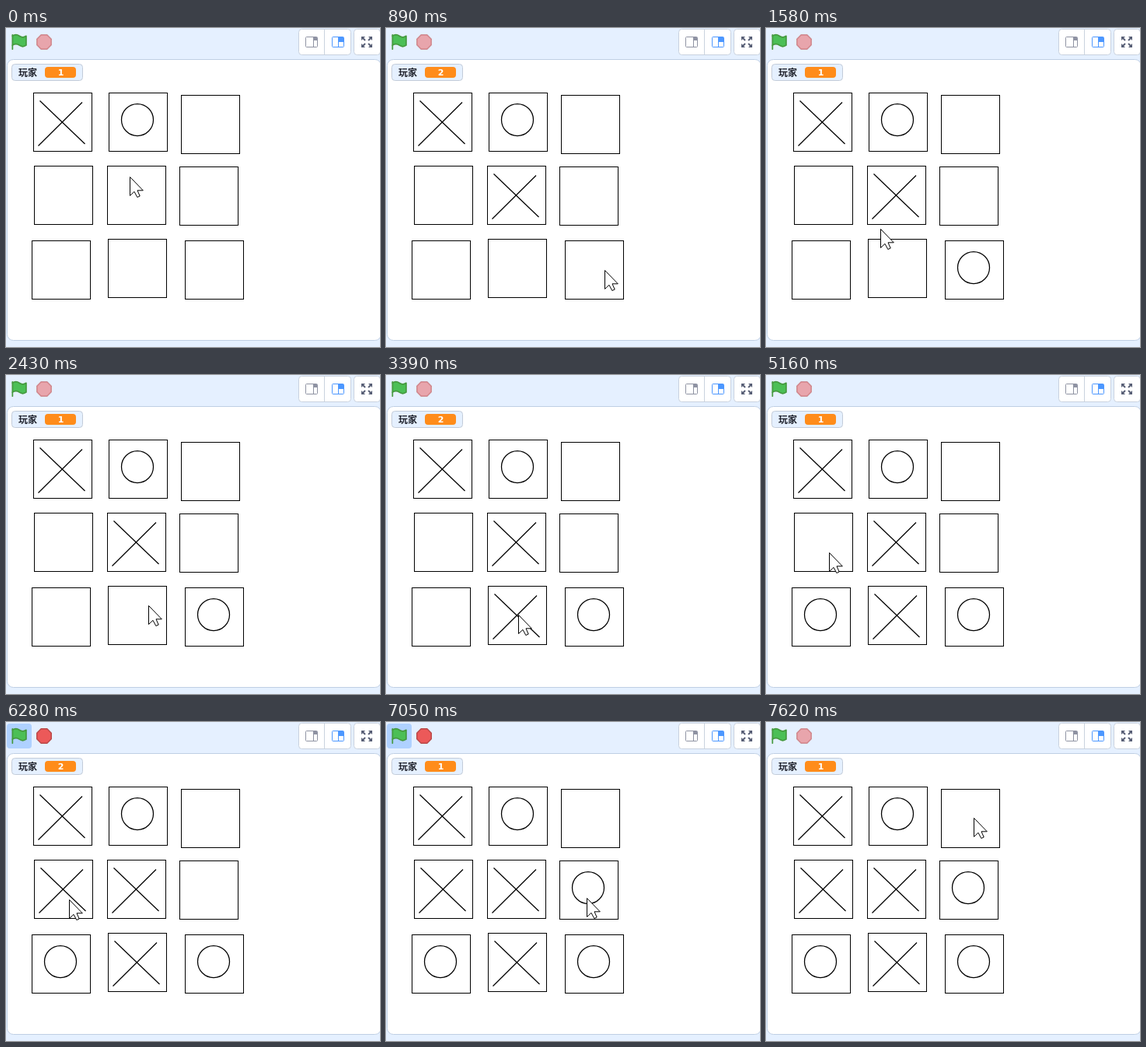
An HTML page with a canvas that plays this animation: 481x410 px, repeating every 8 s.

```html
<!DOCTYPE html>
<html lang="zh">
<head>
<meta charset="utf-8">
<style>
html, body { margin: 0; width: 100%; height: 100%; overflow: hidden; background: #e5f0ff; }
canvas { display: block; }
</style>
</head>
<body>
<canvas id="stage" width="481" height="410"></canvas>
<script>
const ctx = document.getElementById('stage').getContext('2d');
const LOOP = 8000;
const CELL = 75;
const TICK = 130;

// Corners of the loosely placed board squares, row by row.
const corners = [
  [35, 83], [132, 83], [225, 86],
  [36, 177], [130, 177], [223, 178],
  [33, 273], [131, 271], [230, 273]
];

// Time and square of each move; crosses and circles take turns.
const moves = [
  [0, 0], [0, 1], [160, 4], [1170, 8],
  [3390, 7], [4610, 6], [6280, 3], [7050, 5]
];

// Spans in which the program shows as running.
const runs = [[6280, 6400], [7050, 7210]];

// Each glide arrives at a time, in a number of ticks, at a point.
const home = { x: 159, y: 191 };
const glides = [
  [580, 2, 304, 259], [730, 1, 273, 331], [890, 1, 281, 311],
  [1430, 2, 180, 309], [1580, 1, 147, 258], [2130, 4, 96, 224],
  [2430, 1, 183, 296], [2560, 1, 161, 322], [2830, 2, 170, 308],
  [3630, 2, 117, 323], [3900, 2, 89, 313], [5020, 2, 88, 256],
  [5160, 1, 81, 228], [6650, 3, 283, 206], [7050, 3, 258, 226],
  [7620, 2, 267, 123]
].map(([end, ticks, x, y]) => ({ end, ticks, x, y }));

const flagCloth = new Path2D('M.75,2A6.44,6.44,0,0,1,8.44,2h0a6.44,6.44,0,0,0,7.69,0V12.4a6.44,6.44,0,0,1-7.69,0h0a6.44,6.44,0,0,0-7.69,0');
const flagPole = new Path2D('M.75,16.75V.75');
const octagon = new Path2D('M4.3,.5H9.7L13.5,4.3V9.7L9.7,13.5H4.3L.5,9.7V4.3Z');
const arrow = new Path2D('M.5,.5V24.5L6,19.3L9.8,26.5L13.2,25L10,17.8H17.3Z');

const easeOut = p => p * (2 - p);
const mix = (a, b, p) => Math.round(a + (b - a) * p);

function pointerAt(t) {
  const next = glides.findIndex(glide => glide.end > t);
  if (next < 0) return glides.at(-1);
  const from = glides[next - 1] ?? home;
  const to = glides[next];
  const ticksLeft = Math.ceil((to.end - t) / TICK);
  const p = easeOut(Math.max(0, 1 - ticksLeft / to.ticks));
  return { x: mix(from.x, to.x, p), y: mix(from.y, to.y, p) };
}

function box(x, y, w, h, radius, fill, stroke) {
  ctx.beginPath();
  ctx.roundRect(x, y, w, h, radius);
  if (fill) { ctx.fillStyle = fill; ctx.fill(); }
  if (stroke) { ctx.strokeStyle = stroke; ctx.stroke(); }
}

function line(x1, y1, x2, y2) {
  ctx.beginPath();
  ctx.moveTo(x1, y1);
  ctx.lineTo(x2, y2);
  ctx.stroke();
}

function placed(x, y, sx, sy, draw) {
  ctx.save();
  ctx.translate(x, y);
  ctx.scale(sx, sy);
  draw();
  ctx.restore();
}

function paint(path, fill, stroke) {
  ctx.fillStyle = fill;
  ctx.strokeStyle = stroke;
  ctx.fill(path);
  ctx.stroke(path);
}

function drawControls(active) {
  if (active) box(1, 2, 32, 32, 4, '#afd1ff');
  const flagScale = 20 / 17.5;
  placed(7.5, 8, flagScale, flagScale, () => {
    ctx.lineWidth = 1.5;
    ctx.lineCap = ctx.lineJoin = 'round';
    paint(flagCloth, '#4cbf56', '#45993d');
    ctx.stroke(flagPole);
  });
  const stopScale = 20 / 14;
  placed(39, 8, stopScale, stopScale, () => {
    ctx.globalAlpha = active ? 1 : 0.5;
    ctx.lineJoin = 'round';
    paint(octagon, '#ec5959', '#b84848');
  });
}

function drawLayoutIcon(x, split, blockHeight, color) {
  box(x + 0.5, 11.5, 15, 13, 1, '#fff', color);
  line(x + split + 0.5, 12, x + split + 0.5, 24);
  box(x + split, 12, 15 - split, blockHeight, 0, color);
}

function drawViewButtons() {
  const border = '#c9d2df';
  box(376.5, 1.5, 67, 33, 4, '#fff', border);
  line(409.5, 2, 409.5, 34);
  box(447.5, 1.5, 34, 33, 4, '#fff', border);
  drawLayoutIcon(385, 10, 4, '#8f93a3');
  drawLayoutIcon(419, 8, 6, '#4c97ff');

  ctx.fillStyle = ctx.strokeStyle = '#575e75';
  for (const sx of [-1, 1]) for (const sy of [-1, 1]) {
    placed(464, 18, sx, sy, () => {
      ctx.lineWidth = 2;
      line(2, 2, 5, 5);
      ctx.fill(new Path2D('M7,7H2L7,2Z'));
    });
  }
}

function drawMonitor(value) {
  box(7.5, 46.5, 91, 21, 4, '#e5f0ff', '#c3ccd9');
  box(50, 50, 40, 14, 4, '#ff8c1a');
  ctx.fillStyle = '#20232c';
  ctx.textAlign = 'left';
  ctx.font = 'bold 12px "Noto Sans CJK SC", "Noto Sans CJK", sans-serif';
  ctx.fillText('玩家', 16, 62);
  ctx.fillStyle = '#fff';
  ctx.textAlign = 'center';
  ctx.font = 'bold 11px "DejaVu Sans", sans-serif';
  ctx.fillText(value, 70.5, 61);
}

function drawCross(x, y) {
  line(x + 8.5, y + 10.5, x + 66.5, y + 66);
  line(x + 63, y + 12.5, x + 6.5, y + 68.5);
}

function drawCircle(x, y) {
  ctx.beginPath();
  ctx.arc(x + 37, y + 35, 20.5, 0, Math.PI * 2);
  ctx.stroke();
}

function drawBoard(played) {
  ctx.strokeStyle = '#000';
  for (const [x, y] of corners) ctx.strokeRect(x + 0.5, y + 0.5, CELL, CELL);
  ctx.lineWidth = 1.25;
  played.forEach(([, cell], turn) => {
    const drawMark = turn % 2 ? drawCircle : drawCross;
    drawMark(...corners[cell]);
  });
  ctx.lineWidth = 1;
}

function render(t) {
  const played = moves.filter(([time]) => time <= t);
  const pointer = pointerAt(t);
  ctx.lineWidth = 1;
  ctx.fillStyle = '#e5f0ff';
  ctx.fillRect(0, 0, 481, 410);
  drawControls(runs.some(([from, to]) => t >= from && t < to));
  drawViewButtons();
  box(1.5, 40.5, 481, 361, 8, '#fff', '#bfcfe4');
  drawMonitor(1 + played.length % 2);
  drawBoard(played);
  placed(pointer.x, pointer.y, 1, 1, () => paint(arrow, '#fff', '#000'));
}

const start = performance.now();
function tick() {
  render((performance.now() - start) % LOOP);
  requestAnimationFrame(tick);
}
tick();
</script>
</body>
</html>
```
